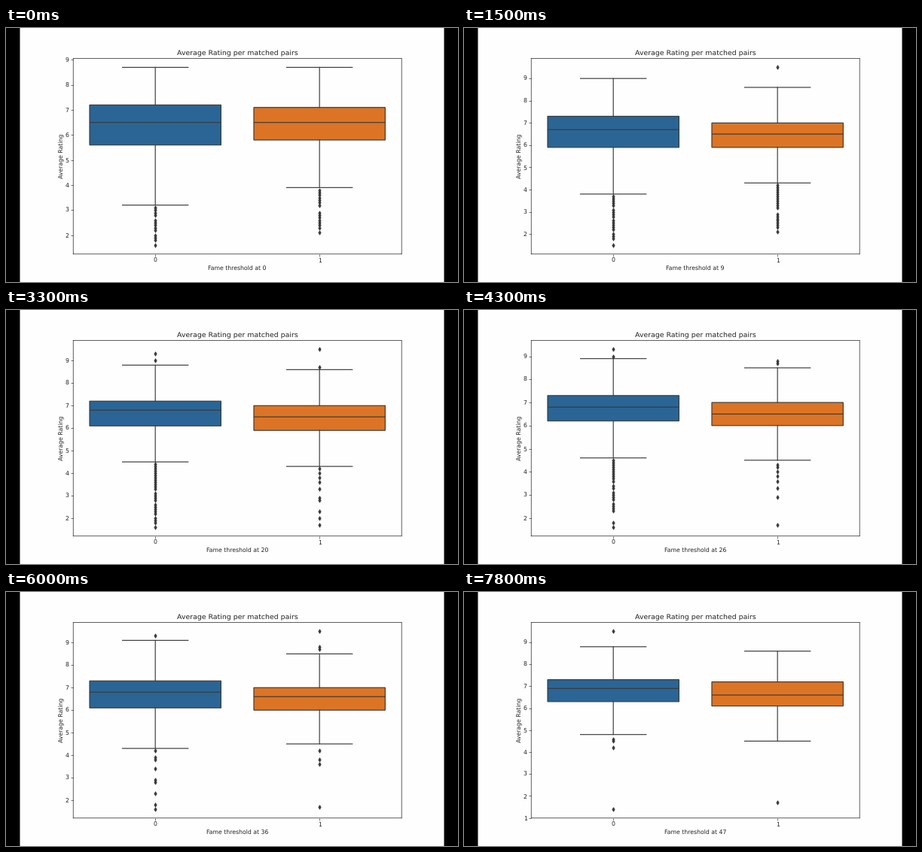
These frames come from a looping animation (600x338 px, 8000 ms). A matplotlib script:

```python
import math

import matplotlib.pyplot as plt
import numpy as np
from matplotlib.animation import FuncAnimation
from matplotlib.patches import Rectangle
from matplotlib.ticker import MultipleLocator

W, H, DPI = 600, 338, 64
SCALE = 56.25 / DPI          # plot was laid out as a 10 x 6 inch chart
PAGE, INK, TEXT = "#fefefe", "#3a3a3a", "#222222"
FILLS = ("#2a6595", "#dc7425")
LINE = 1.5 * SCALE

plt.rcParams.update({
    "font.family": "DejaVu Sans",
    "font.size": 10 * SCALE,
    "text.color": TEXT,
    "text.hinting": "none",
    "path.snap": False,
    "axes.titlesize": 12 * SCALE,
    "axes.titlepad": 6 * SCALE,
    "axes.labelpad": 2.4 * SCALE,
    "axes.labelcolor": TEXT,
    "axes.linewidth": 0.8 * SCALE,
    "axes.facecolor": PAGE,
})
for side in ("xtick", "ytick"):
    plt.rcParams.update({
        side + ".color": TEXT,
        side + ".major.size": 3.5 * SCALE,
        side + ".major.width": 0.8 * SCALE,
        side + ".major.pad": 3.5 * SCALE,
    })

# All ratings are whole tenths; every tenth has a fixed chance to be an outlier
CHANCE = np.random.default_rng(4).random((2, 100))

# High outliers per box: rating, first and last threshold
STRAYS = (
    ((90, 10, 35), (93, 10, 41), (95, 42, 47)),
    ((87, 18, 41), (88, 21, 41), (95, 7, 24), (95, 27, 41)),
)


def curve(n, *points):
    """Rating in tenths along straight lines through (threshold, rating)."""
    return round(float(np.interp(n, *zip(*points))))


def left_shape(n):
    q1 = curve(n, (0, 56), (3, 55), (9, 59), (26, 62), (36, 61), (47, 63))
    med = round(65 + 3.6 * (1 - math.exp(-n / 12)))
    q3 = curve(n, (3, 72), (9, 73), (20, 72), (26, 73))
    floor = curve(n, (3, 16), (9, 15), (20, 16), (36, 16), (47, 14))
    top = curve(n, (3, 87), (9, 90), (36, 91))
    density = np.interp(n, (20, 47), (0.9, 0.05))
    return q1, med, q3, floor, top, density


def right_shape(n):
    q1 = round(58 + n / 15)
    med = round(65 + n / 60)
    q3 = curve(n, (0, 71), (3, 70), (36, 70), (47, 72))
    floor = curve(n, (0, 21), (3, 16), (9, 21), (20, 17))
    top = curve(n, (0, 87), (3, 86))
    density = np.interp(n, (9, 47), (0.88, -0.2))
    return q1, med, q3, floor, top, density


def box_stats(n, col):
    q1, med, q3, floor, top, density = (left_shape, right_shape)[col](n)
    reach = 1.5 * (q3 - q1)
    low = math.ceil(q1 - reach)
    high = min(top, math.floor(q3 + reach))
    # outliers crowd below the whisker and thin out further down
    fliers = [floor] + [v for v in range(floor + 1, low)
                        if CHANCE[col, v] < density + (v - 30) / 80]
    fliers += [v for v, first, last in STRAYS[col]
               if first <= n <= last and v > high]
    return dict(label=str(col), whislo=low / 10, q1=q1 / 10, med=med / 10,
                q3=q3 / 10, whishi=high / 10, fliers=[v / 10 for v in fliers])


fig = plt.figure(figsize=(W / DPI, H / DPI), dpi=DPI, facecolor="black")
fig.add_artist(Rectangle((18.5 / W, 0), 563 / W, 1, transform=fig.transFigure,
                         facecolor=PAGE, edgecolor="none", zorder=-1))
ax = fig.add_axes([89.2 / W, 0.11, 435.94 / W, 0.77])

stroke = dict(color=INK, linewidth=LINE)
diamond = dict(marker="d", markersize=5 * SCALE, markerfacecolor=INK,
               markeredgecolor=INK, markeredgewidth=SCALE, linestyle="none")


def draw(i):
    n = int(0.6 * i + 0.3)   # six thresholds per second
    ax.clear()
    stats = [box_stats(n, col) for col in (0, 1)]
    parts = ax.bxp(stats, positions=[0, 1], widths=0.8, capwidths=0.4,
                   patch_artist=True, whiskerprops=stroke, capprops=stroke,
                   medianprops=stroke, flierprops=diamond,
                   boxprops=dict(edgecolor=INK, linewidth=LINE))
    for box, fill in zip(parts["boxes"], FILLS):
        box.set_facecolor(fill)
    values = [v for s in stats for v in [s["whislo"], s["whishi"], *s["fliers"]]]
    lo, hi = min(values), max(values)
    pad = 0.05 * (hi - lo)
    ax.set_xlim(-0.5, 1.5)
    ax.set_ylim(lo - pad, hi + pad)
    ax.yaxis.set_major_locator(MultipleLocator(1))
    ax.set_title("Average Rating per matched pairs")
    ax.set_xlabel(f"Fame threshold at {n}")
    ax.set_ylabel("Average Rating")
    return []


anim = FuncAnimation(fig, draw, frames=80, interval=100, repeat=True,
                     repeat_delay=0, init_func=lambda: draw(0))
plt.show()
```
